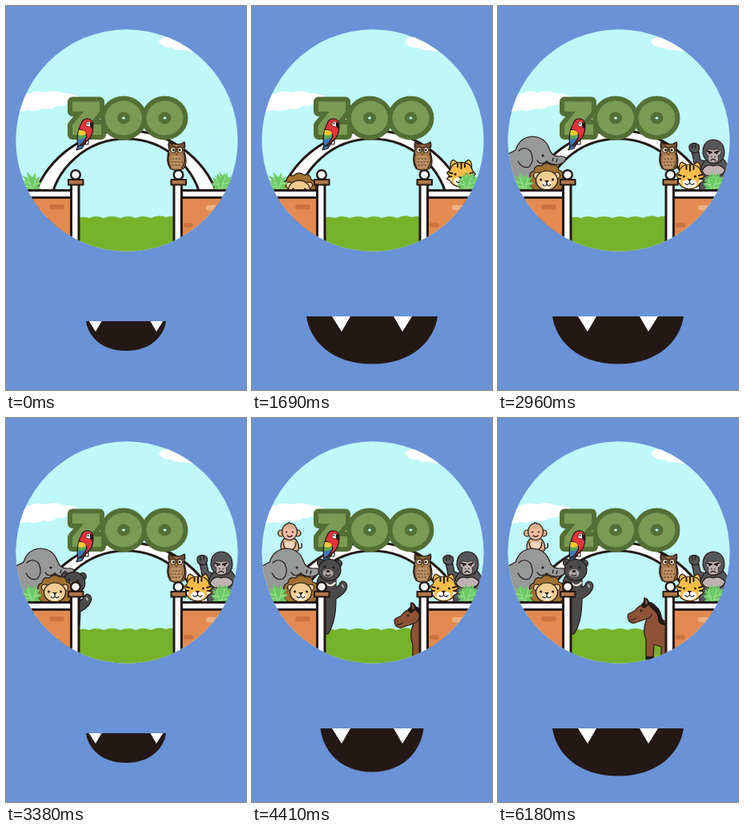
An HTML page for the animation above (6.35 s loop, 300 by 480 pixels).

```html
<!DOCTYPE html>
<html lang="en">
<head>
<meta charset="utf-8">
<title>Zoo</title>
<style>
html, body { margin: 0; height: 100%; overflow: hidden; background: #6a92d6; }
svg { display: block; width: 300px; height: 480px; }
.ink { stroke: #231815; stroke-width: 1.2; stroke-linejoin: round; stroke-linecap: round; }
.bold { stroke-width: 3; }
.flat { stroke: none; }
.line { fill: none; }
.dot { fill: #231815; stroke: none; }
</style>
</head>
<body>
<svg viewBox="0 0 300 480">
<defs>
  <clipPath id="porthole"><circle cx="151" cy="168" r="138.7"/></clipPath>
  <clipPath id="lips"><path class="mouth"/></clipPath>
  <g id="post">
    <path class="bold" fill="#fff" d="M81.500 222H91V310H81.500Z"/>
    <path fill="#b0764a" stroke-width="2" d="M78 217H96.500V223.500H78Z"/>
    <circle cx="87" cy="211" r="5.8" fill="#fff" stroke-width="2.4"/>
  </g>
  <g id="fern" class="flat">
    <path fill="#6ccb66" d="M33 232L22 230L26 227L17 225L24 222L17 218L25 218L20 212L28 215L26 207L33 214L37 208L37 216L43 213L40 220L45 221L40 225L44 229Z"/>
    <path class="line" stroke="#a8e39b" stroke-width="1" d="M33 230L27 213M30 222L21 219M31 226L22 225M34 228L38 214M35 223L42 221"/>
  </g>
</defs>

<g clip-path="url(#porthole)" class="ink">
  <path class="flat" fill="#bef8f9" d="M0 25H300V310H0Z"/>
  <path class="flat" fill="#fff" d="M10 131V113Q18 106 28 110Q38 104 49 108Q62 104 72 109Q84 108 94 115Q86 120 78 120Q75 126 63 125Q57 131 47 128Q38 133 28 130Q18 133 10 131ZM191 44Q195 38 206 39L224 35L240 58Q229 57 222 55Q212 56 207 52Q195 53 191 44Z"/>
  <path class="flat" fill="#77b22b" d="M85 310V266Q94 262 104 265Q112 261 122 265Q132 261 143 265Q153 261 162 265Q172 261 181 265Q191 260 200 264Q208 261 218 265V310Z"/>
  <path class="bold" fill="#fff" fill-rule="evenodd" d="M31.600 250A121.400 121.400 0 0 1 268.400 250L245.500 250A96.300 96.300 0 0 0 54.500 250Z"/>

  <!-- ZOO sign -->
  <path fill="#7a9b54" fill-rule="evenodd" style="stroke:#546f35;paint-order:stroke" stroke-width="12" d="M83 119.500H117V132L104 148H119V161H83V149L97 132H83Z
    M124 140a23 21.500 0 0 1 46 0a23 21.500 0 0 1 -46 0ZM139 140a8 7.500 0 0 1 16 0a8 7.500 0 0 1 -16 0Z
    M175.500 140a23 21.500 0 0 1 46 0a23 21.500 0 0 1 -46 0ZM190.500 140a8 7.500 0 0 1 16 0a8 7.500 0 0 1 -16 0Z"/>

  <!-- parrot -->
  <path fill="#3d78b8" d="M93 166L88 180L95 178L101 168Z"/>
  <path fill="#e2343b" d="M94 147Q96 140 103 141Q109 142 109 150Q109 162 102 168L94 175Q89 170 90 161Q91 152 94 147Z"/>
  <path fill="#3d78b8" d="M91 154Q100 155 101 163Q98 171 90 176Q88 165 91 154Z"/>
  <path class="flat" fill="#5aa84c" d="M91 158Q100 159 100 163Q96 167 90 166Z"/>
  <path class="flat" fill="#f3c933" d="M91 155Q100 155 100 160Q96 163 90 161Z"/>
  <path fill="#fff" stroke-width=".7" d="M101 145Q106 143 107 149Q104 153 100 149Z"/>
  <path class="dot" d="M105 145Q111 146 108 154Q104 151 105 145Z"/>
  <circle class="dot" cx="102.500" cy="147" r="1"/>
  <path class="line" d="M100 168L99 173L103 173M103 166L103 172"/>

  <g data-id="horse">
    <path fill="#8e5337" d="M185 302V277Q180 266 186 251Q180 253 174 255Q168 258 164 254Q161 249 163 245L171 241Q175 235 182 233L183 225Q187 225 189 231Q199 235 202 247Q205 256 225 259V310H204V286L195 283L194 302Z"/>
    <path class="dot" d="M179 233Q182 228 185 230L191 230Q203 236 205 249Q206 256 212 259Q202 260 200 253Q201 246 194 240L188 234L183 238Q179 237 179 233ZM185 298H194V304H185Z"/>
    <path fill="#8e5337" d="M184 234L183 225Q187 226 188 233Z"/>
    <circle class="dot" cx="179" cy="241" r="1.400"/>
    <circle class="dot" cx="165.500" cy="248" r=".8"/>
    <path class="line" d="M166 252Q170 253 172 250M186 251Q192 249 192 245"/>
  </g>

  <g data-id="monkey">
    <g fill="#deb18a">
      <path class="line" stroke-width="1.400" d="M56 163Q64 164 62 157"/>
      <path d="M40 151Q34 157 37 166H58Q60 157 54 151Z"/>
      <circle cx="36.500" cy="144" r="4"/><circle cx="57" cy="144" r="4"/>
      <ellipse cx="47" cy="142" rx="9.500" ry="10.500"/>
      <path d="M45 132Q46 129 48 132"/>
    </g>
    <path class="flat" fill="#f1b9a2" d="M47 140Q52 135 55 141Q56 151 47 152Q38 151 39 141Q42 135 47 140Z"/>
    <path class="flat" fill="#f5d5bc" d="M42 155H52Q54 161 50 165H44Q40 161 42 155Z"/>
    <circle class="dot" cx="43" cy="142.500" r="1.100"/><circle class="dot" cx="51" cy="142.500" r="1.100"/>
    <path class="line" d="M44 147Q47 150 50 147M39 155Q39 162 43 164M55 155Q55 162 51 164"/>
  </g>

  <g data-id="elephant">
    <path fill="#979898" d="M0 235V190Q12 186 22 180Q27 164 43 163Q59 164 64 178Q67 188 76 188Q82 187 85 190Q84 196 76 198Q66 199 61 194Q59 204 50 209V235Z"/>
    <path class="line" d="M26 181Q33 174 41 182Q46 194 39 201Q30 204 25 194"/>
    <circle class="dot" cx="56" cy="187" r="1.500"/>
    <path class="line" d="M49 193Q53 200 61 194M69 190L68 194M74 191L73 195"/>
  </g>

  <g data-id="gorilla">
    <g data-id="arm" fill="#55565a">
      <path d="M260 210Q245 207 244 190L242 182H251L253 192L263 196Z"/>
      <path d="M240 181Q237 174 242 172Q247 170 251 174Q253 180 249 183Q244 185 240 181Z"/>
      <path class="line" d="M243 173V178M247 172V177"/>
    </g>
    <path fill="#55565a" d="M252 230Q250 204 258 194Q267 186 281 191Q291 198 291 230Z"/>
    <path fill="#c0b1b3" d="M255 206Q260 196 269 200Q277 196 284 205Q281 213 269 212Q258 214 255 206Z"/>
    <path fill="#55565a" d="M256 184Q256 168 269 167Q283 168 283 184Q282 196 269 197Q258 195 256 184Z"/>
    <path fill="#c0b1b3" stroke-width=".7" d="M260 182Q261 177 269 180Q278 177 279 182Q279 186 275 187Q278 196 269 196Q261 197 263 187Q260 186 260 182Z"/>
    <path class="line" stroke-width="2.200" d="M262 181.500L267 183M271 183L276 181.500"/>
    <circle class="dot" cx="264.500" cy="184" r="1.300"/><circle class="dot" cx="273.500" cy="184" r="1.300"/>
    <path class="line" d="M267 188V189M271 188V189M266 193Q269 190 272 193"/>
  </g>

  <g data-id="bear">
    <g fill="#4a4a4b">
      <path d="M84 198Q76 210 78 270H95Q105 255 105 226Q118 219 119 210Q118 204 113 204Q109 206 109 209L105 212L105 200Z"/>
      <circle cx="86" cy="181" r="4.500"/><circle cx="108" cy="182" r="4.500"/>
      <ellipse cx="97" cy="190" rx="14" ry="13.500"/>
    </g>
    <ellipse class="flat" cx="95" cy="194" rx="6.500" ry="5" fill="#a9a5a2"/>
    <circle class="dot" cx="91" cy="186" r="1.500"/><circle class="dot" cx="102" cy="187" r="1.500"/>
    <ellipse class="dot" cx="95" cy="191.500" rx="2.400" ry="1.600"/>
    <path class="line" d="M92 196Q95 199 98 196"/>
    <path class="line" style="stroke:#eee8da" stroke-width="2" d="M93 207Q98 212 104 206"/>
    <path class="line" style="stroke:#a9a5a2" stroke-width="2.500" d="M113 209L114 211"/>
  </g>

  <!-- owl -->
  <path fill="#a97a4b" d="M204 179Q202 173 204 170Q208 173 213 173Q219 173 223 170Q225 174 222 180Q228 196 222 203Q213 208 205 203Q199 194 204 179Z"/>
  <path class="flat" fill="#bd9162" d="M207 188Q213 185 219 188Q222 200 218 203H208Q204 198 207 188Z"/>
  <path class="line" stroke-width=".8" stroke-dasharray="1.500 2.500" d="M208 191H219M207 195H220M208 199H219"/>
  <path class="line" d="M204 184Q201 195 206 202M222 184Q226 195 220 202"/>
  <path fill="#7a5232" stroke-width=".8" d="M204 170Q208 175 213 177Q219 175 223 170Q224 174 222 177L213 180L205 177Z"/>
  <circle cx="209" cy="180" r="3.300" fill="#fff4cf" stroke-width=".9"/><circle cx="217.500" cy="180" r="3.300" fill="#fff4cf" stroke-width=".9"/>
  <circle class="dot" cx="209.500" cy="180" r="1.600"/><circle class="dot" cx="217" cy="180" r="1.600"/>
  <path fill="#f2b434" stroke-width=".7" d="M211.500 182H215L213.200 186Z"/>

  <g data-id="lion">
    <path fill="#9f7132" d="M44 229Q37 224 41 217Q37 209 45 206Q46 198 54 200Q60 194 67 199Q75 197 76 205Q84 207 81 215Q85 223 79 229Q70 236 62 232Q53 236 44 229Z"/>
    <circle cx="48.500" cy="212" r="4" fill="#f1cc92"/><circle cx="73.500" cy="212" r="4" fill="#f1cc92"/>
    <ellipse cx="61" cy="218" rx="13.500" ry="12" fill="#f1cc92"/>
    <ellipse class="flat" cx="61" cy="223" rx="6.500" ry="5" fill="#fff3dc"/>
    <circle class="dot" cx="53.500" cy="217" r="1.500"/><circle class="dot" cx="68.500" cy="217" r="1.500"/>
    <path class="dot" d="M58 218H64L61 221.500Z"/>
    <path class="line" d="M61 221V223Q58 227 56 223M61 223Q64 227 66 223"/>
  </g>

  <g data-id="tiger">
    <g fill="#fbbd4a">
      <path d="M227 207Q225 197 230 195L238 200Z"/><path d="M253 206Q254 197 249 195L242 200Z"/>
      <path d="M240 198Q252 198 254 208L258 213L255 215L257 219L253 221Q249 229 239 229Q229 228 226 221L222 219L225 215L222 211L226 208Q228 198 240 198Z"/>
    </g>
    <ellipse class="flat" cx="239.500" cy="222" rx="9" ry="5.500" fill="#fff"/>
    <path class="flat" fill="#fff" d="M224 218.500L228 217V222ZM255.500 218.500L251 217V222Z"/>
    <path class="line" stroke-width="2" d="M240 199V206M235.500 200V204M244.500 200V204M225 211L229 212M225 216L228 216M255 211L251 212M255 216L252 216"/>
    <circle class="dot" cx="232.500" cy="213" r="1.500"/><circle class="dot" cx="246.500" cy="213" r="1.500"/>
    <path class="dot" d="M236.500 216H242.500L239.500 219.500Z"/>
    <path class="line" d="M239.500 219V221Q237 225 234 222M239.500 221Q242 225 245 222"/>
  </g>

  <use href="#fern"/>
  <use href="#fern" transform="translate(240 0)"/>
  <use href="#fern" transform="matrix(-1 0 0 1 301 1)"/>

  <!-- walls -->
  <path class="flat" fill="#e38a50" d="M0 238H82V310H0ZM219 238H300V310H219Z"/>
  <rect class="flat" fill="#cc7440" x="54" y="248" width="19" height="6.500" rx="3.200"/>
  <rect class="flat" fill="#cc7440" x="222" y="271" width="12" height="6" rx="3"/>
  <rect class="flat" fill="#f0b083" x="250" y="249" width="17" height="6.500" rx="3.200"/>
  <path class="bold" fill="#fff" d="M-5 230.500H82V239.500H-5ZM219 230.500H305V239.500H219Z"/>
  <use href="#post"/>
  <use href="#post" x="128.500"/>
</g>

<path class="mouth" fill="#231815"/>
<path clip-path="url(#lips)" fill="#fff" d="M100 388H123L112 407ZM177 388H200L188 407Z"/>
</svg>
<script>
const LOOP = 6350;
// Time in ms against the drawing count; motion and pauses run at different rates.
const PACE = [[0, 0], [1020, 30], [2830, 90], [2960, 94], [4650, 150], [LOOP, 200]];
// Each key: count, then the offset from the resting place.
const MOVES = {
  lion: [[30, -6, 36], [66, 0, 0]],
  tiger: [[30, 24, 38], [48, 24, -3], [68, 0, 0]],
  elephant: [[56, -95, 32], [88, 0, 0]],
  gorilla: [[60, 4, 54], [88, 0, 0]],
  arm: [[72, 14, 26], [88, 0, 0]],
  monkey: [[94, -4, 102], [120, 0, 0]],
  bear: [[94, -30, 60], [112, -8, 6], [124, 0, 0]],
  horse: [[122, 80, 30], [150, 0, 0]]
};
// Half width, top, depth
const MOUTHS = [[50, 394, 37], [64.5, 388, 54.5], [82, 388, 59.5]];
const CYCLE = [0, 1, 2, 1];

const parts = Object.keys(MOVES).map(id => [document.querySelector(`[data-id=${id}]`), MOVES[id]]);
const lips = document.querySelectorAll('.mouth');
const smooth = p => p * p * (3 - 2 * p);
const linear = p => p;

function tween(keys, x, ease) {
  const next = keys.findIndex(k => k[0] > x);
  if (next === 0) return keys[0].slice(1);
  if (next < 0) return keys[keys.length - 1].slice(1);
  const a = keys[next - 1], b = keys[next];
  const p = ease((x - a[0]) / (b[0] - a[0]));
  return a.slice(1).map((v, i) => v + (b[i + 1] - v) * p);
}

function mouthPath([w, top, depth]) {
  const at = (x, y) => `${150 + x * w} ${top + y * depth}`;
  return `M${at(-1, 0)}H${150 + w}C${at(.95, .5)} ${at(.62, 1)} ${at(0, 1)}` +
    `S${at(-.95, .5)} ${at(-1, 0)}Z`;
}

function draw(now) {
  const count = Math.floor(tween(PACE, now % LOOP, linear)[0] + 1e-6);
  for (const [el, keys] of parts) {
    el.setAttribute('transform', `translate(${tween(keys, count, smooth)})`);
  }
  // The mouth stays wide for two beats halfway through.
  const beat = Math.floor(count / 5);
  const d = mouthPath(MOUTHS[CYCLE[(beat < 19 ? beat : beat - 1) % 4]]);
  lips.forEach(el => el.setAttribute('d', d));
}

const start = performance.now();
function tick() {
  draw(performance.now() - start);
  requestAnimationFrame(tick);
}
tick();
</script>
</body>
</html>
```
